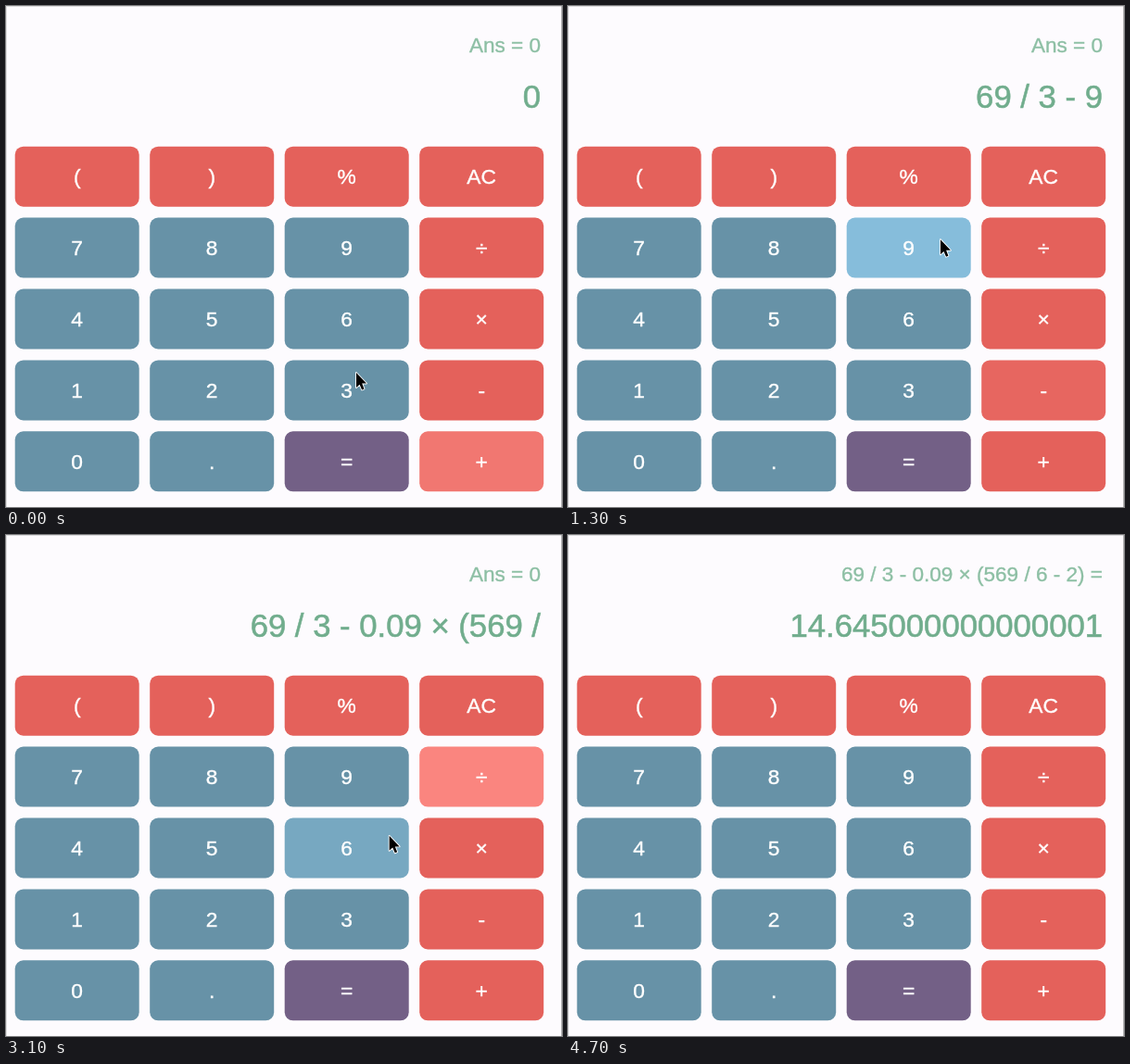
An HTML page with a canvas that plays this animation: 600x541 px, repeating every 4.8 s.

```html
<!DOCTYPE html>
<html lang="en">
<head>
<meta charset="utf-8">
<title>Calculator</title>
<style>
html, body { margin: 0; width: 100%; height: 100%; overflow: hidden; background: #fdfbfe; }
canvas { display: block; }
</style>
</head>
<body>
<canvas id="stage" width="600" height="541"></canvas>
<script>
const ctx = document.getElementById('stage').getContext('2d');
const LOOP = 4800, STEP = 100;
const FONT = '"Liberation Sans", Arial, sans-serif';
const ROWS = ['( ) % AC', '7 8 9 ÷', '4 5 6 ×', '1 2 3 -', '0 . = +'].map(r => r.split(' '));
const KEY = { x: 9.7, y: 151.7, w: 134, h: 65, dx: 145.5, dy: 76.9, r: 9 };
const BLUE = [[103, 146, 167], [134, 189, 219]];
const RED = [[228, 97, 91], [250, 133, 127]];
const PURPLE = [[115, 96, 134], [152, 132, 174]];
const SPELLED = { '÷': ' / ', '-': ' - ', '(': ' × (', '=': ' =' };

// Keys are tapped in steady bursts
const burst = (keys, start, gap) => [...keys].map((key, i) => ({ key, t: start + i * gap }));
const TAPS = [
  ...burst('69÷3-9', 350, 176),
  ...burst('%(', 1750, 330),
  ...burst('569÷6-', 2365, 195),
  ...burst('2)=', 3620, 280)
];
const EARLIER = { key: '+', t: -200 };

const clamp = v => Math.max(0, Math.min(1, v));
const mix = (a, b, k) => a + (b - a) * k;

function keyCentre(label) {
  const row = ROWS.findIndex(r => r.includes(label));
  return {
    x: KEY.x + KEY.w / 2 + ROWS[row].indexOf(label) * KEY.dx,
    y: KEY.y + KEY.h / 2 + row * KEY.dy
  };
}

// The pointer stops on the side of a key it came from, with a slight sway
function aim({ key, t }, i) {
  const to = keyCentre(key), from = keyCentre((TAPS[i - 1] || EARLIER).key);
  return { t, x: to.x + 36 * Math.sign(from.x - to.x), y: to.y + 13 * Math.cos(i * 0.8) };
}
const PATH = [{ t: 0, x: 378, y: 396 }, ...TAPS.map(aim), { t: 4500, x: 340, y: 565 }];

function pointerAt(t) {
  const i = PATH.findIndex(p => p.t > t);
  if (i < 0) return null;
  const a = PATH[i - 1], b = PATH[i];
  const k = (t - a.t) / (b.t - a.t), ease = k * k * (3 - 2 * k);
  const sag = 0.2 * Math.abs(b.x - a.x) * Math.sin(Math.PI * k);
  return [mix(a.x, b.x, ease), mix(a.y, b.y, ease) + sag];
}

function glow(label, t) {
  const levels = [EARLIER, ...TAPS].filter(p => p.key === label)
    .map(p => Math.min(clamp((t - p.t + 110) / 130), clamp((p.t + 260 - t) / 100)));
  return Math.max(0, ...levels);
}

function displayAt(t) {
  const typed = TAPS.filter(p => p.t <= t).map(p => SPELLED[p.key] || p.key)
    .join('').replace('9%', '0.09').trim();
  if (typed.endsWith('=')) return [typed, '14.645000000000001'];
  return ['Ans = 0', typed || '0'];
}

// A hairline outline gives the lettering a little more weight
function label(str, x, base, size, color, align) {
  ctx.font = size + 'px ' + FONT;
  ctx.textAlign = align;
  ctx.fillStyle = ctx.strokeStyle = color;
  ctx.lineWidth = size / 60;
  ctx.fillText(str, x, base);
  ctx.strokeText(str, x, base);
}

function drawKey(name, col, row, t) {
  const x = KEY.x + col * KEY.dx, y = KEY.y + row * KEY.dy;
  const [dim, lit] = name === '=' ? PURPLE : row === 0 || col === 3 ? RED : BLUE;
  const level = glow(name, t);
  ctx.fillStyle = 'rgb(' + dim.map((c, i) => Math.round(mix(c, lit[i], level))).join(',') + ')';
  ctx.beginPath();
  ctx.roundRect(x, y, KEY.w, KEY.h, KEY.r);
  ctx.fill();
  label(name, x + KEY.w / 2, y + 40.4, 22.8, '#fff', 'center');
}

function drawPointer(x, y) {
  ctx.save();
  ctx.translate(x, y);
  ctx.beginPath();
  [[0, 0], [0, 16], [3.6, 12.7], [6.1, 18.5], [8.5, 17.4], [6.2, 11.6], [11, 11.6]]
    .forEach(([px, py]) => ctx.lineTo(px, py));
  ctx.closePath();
  ctx.lineJoin = 'round';
  ctx.lineWidth = 1.8;
  ctx.strokeStyle = '#fff';
  ctx.stroke();
  ctx.fillStyle = '#000';
  ctx.fill();
  ctx.restore();
}

function draw(t) {
  ctx.fillStyle = '#fdfbfe';
  ctx.fillRect(0, 0, 600, 541);
  ctx.fillStyle = '#dddcde';
  ctx.fillRect(0, 0, 600, 1);
  ctx.fillRect(0, 0, 1, 541);
  ctx.fillStyle = '#b4b3b5';
  ctx.fillRect(599, 0, 1, 541);

  const [small, big] = displayAt(t);
  label(small, 577, 50, 22.55, '#8dbfa4', 'right');
  label(big, 577, 109.5, 34.7, '#71ad8d', 'right');

  ROWS.forEach((keys, row) => keys.forEach((name, col) => drawKey(name, col, row, t)));
  const tip = pointerAt(t);
  if (tip) drawPointer(...tip);
}

const start = performance.now();
function tick(now) {
  const t = Math.max(0, now - start) % LOOP;
  draw(Math.floor(t / STEP) * STEP);
  requestAnimationFrame(tick);
}
draw(0);
requestAnimationFrame(tick);
</script>
</body>
</html>
```
